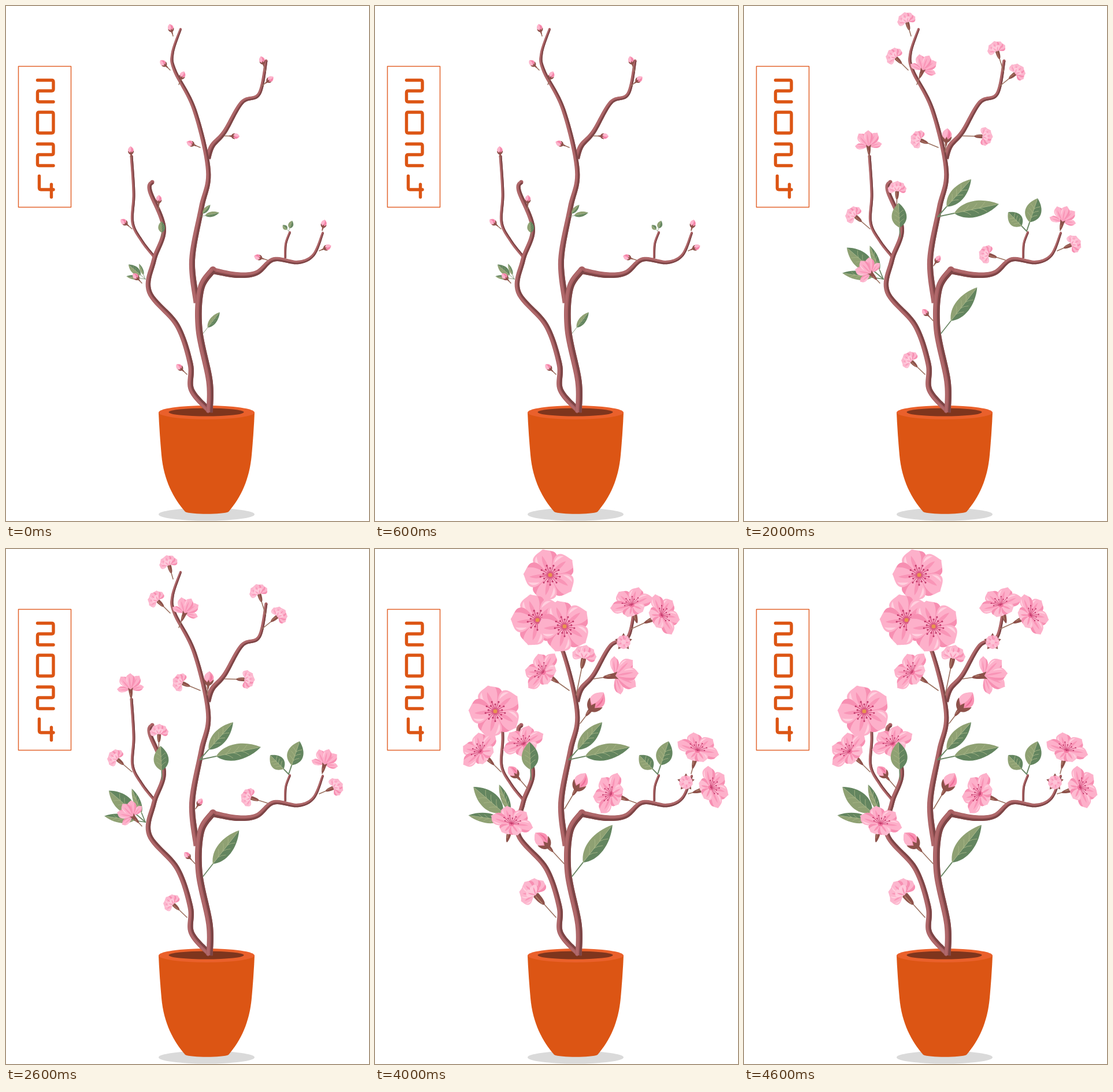
An HTML page with a canvas for the animation above (5 s loop, 628 by 892 pixels).

```html
<!DOCTYPE html>
<html lang="en">
<head>
<meta charset="utf-8">
<title>Blossom in a pot</title>
<style>
  html, body { margin: 0; width: 100%; height: 100%; overflow: hidden; background: #fff; }
  canvas { display: block; }
</style>
</head>
<body>
<canvas id="stage" width="628" height="892" role="img" aria-label="2024"></canvas>
<script>
const g = document.getElementById('stage').getContext('2d');
const STEP = 1000, STAGES = 5;
const WOOD = '#a95f62', WOOD_DARK = '#7c4546';
const CALYX = '#8d514a', STALK = '#9a7160', MAGENTA = '#c33a6b', ORANGE = '#dc5514';

// ---------- helpers ----------
const mix = (a, b, t) => a + (b - a) * t;
const fill = (d, color) => { g.fillStyle = color; g.fill(new Path2D(d)); };
const line = (d, color, width) => {
  g.strokeStyle = color; g.lineWidth = width;
  g.stroke(new Path2D(d));
};
const ellipse = (x, y, rx, ry, color) => {
  g.fillStyle = color;
  g.beginPath(); g.ellipse(x, y, rx, ry, 0, 0, 7); g.fill();
};
function within(x, y, angle, sx, sy, paint) {
  g.save();
  g.translate(x, y); g.rotate(angle); g.scale(sx, sy);
  paint();
  g.restore();
}

// ---------- pot and sign ----------
function pot() {
  ellipse(347, 880.5, 83, 11, '#dadada');
  fill('M264 704C265 730 267 755 269 778C273 822 290 853 310 876C320 881 375 881 385 876C407 850 421 820 425 778C427 755 429 730 430 704Z', ORANGE);
  ellipse(347, 704, 83, 12, '#ea602b');
  ellipse(346.5, 703.5, 65, 7, '#7e351d');
}

function sign() {
  g.lineCap = g.lineJoin = 'round';
  line('M21.5 104.5H112.5V348.5H21.5Z', '#e2642c', 1.5);
  const two = y => `M54.5 ${y}H79q3 0 3 3v12.5q0 3 -3 3H57.5q-3 0 -3 3v13q0 3 3 3H82`;
  line(two(128.5) + two(239), ORANGE, 5.4);
  line('M57.5 184H79q3 0 3 3V217q0 3 -3 3H57.5q-3 0 -3 -3V187q0 -3 3 -3Z', ORANGE, 5.4);
  line('M57.5 294.5V315q0 3 3 3H82M78.5 309V331', ORANGE, 5.4);
}

// ---------- branches: a smooth curve through a few points, tapering from one width to another ----------
function branch(thick, thin, ...points) {
  const n = points.length / 2, steps = 12 * (n - 1);
  const knot = (i, k) => points[2 * Math.max(0, Math.min(n - 1, i)) + k];
  const spline = (i, t, k) => {
    const [a, b, c, d] = [-1, 0, 1, 2].map(o => knot(i + o, k));
    return b + t / 2 * (c - a + t * (2 * a - 5 * b + 4 * c - d + t * (3 * (b - c) + d - a)));
  };
  const mid = Array.from({ length: steps + 1 }, (_, s) =>
    [0, 1].map(k => spline(Math.floor(s / 12), s % 12 / 12, k)));
  const edge = side => mid.map(([x, y], i) => {
    const a = mid[Math.max(0, i - 1)], b = mid[Math.min(steps, i + 1)];
    const dx = b[0] - a[0], dy = b[1] - a[1];
    const s = side * mix(thick, thin, i / steps) / 2 / Math.hypot(dx, dy);
    return [x - dy * s, y + dx * s];
  });
  const band = (from, to, color) =>
    fill('M' + [...edge(from), ...edge(to).reverse()].join('L') + 'Z', color);
  ellipse(...mid[steps], thin / 2, thin / 2, WOOD);
  band(-1, 1, WOOD);
  band(-0.8, -0.2, '#b06a6c');
  band(0.2, 1, WOOD_DARK);
}

function tree() {
  branch(5, 5, 256,434, 235,407, 219,375, 221,325, 217,260);
  branch(4, 4, 483,437, 484,412, 491,392);
  branch(10, 5, 349,264, 357,242, 378,218, 408,167, 438,152, 450,95);
  branch(11, 4, 330,514, 322,440, 338,350, 350,285, 326,180, 292,112, 288,82, 302,40);
  branch(10, 7, 353,702, 321,665, 319,620, 296,553, 248,495, 256,440, 273,385, 249,320, 253,305);
  branch(11, 4, 356,458, 400,466, 434,462, 463,439, 505,444, 532,431, 548,393);
  branch(11, 12, 352,704, 352,650, 334,560, 337,490, 358,457);
}

// ---------- leaves: the tip's offset from the root is given at full growth ----------
const early = stage => Math.min(1, 0.32 + 0.46 * stage);
const late = stage => 1 - 0.6 * Math.exp(-0.75 * stage);

function leaf(x, y, tx, ty, half, size) {
  const stalk = 0.27, len = Math.hypot(tx, ty) * (1 - stalk);
  const side = h => `M0 0C${len * 0.22} ${h * 1.35} ${len * 0.65} ${h * 1.3} ${len} 0Z`;
  within(x, y, 0, size, size, () => {
    line(`M0 0L${tx * stalk} ${ty * stalk}`, '#6d8a68', 2);
    within(tx * stalk, ty * stalk, Math.atan2(ty, tx), 1, 1, () => {
      fill(side(-half), '#8fa173');
      fill(side(half), '#63855f');
      let veins = `M0 0H${len * 0.93}`;
      for (const f of [0.2, 0.38, 0.56])
        for (const s of [-1, 1]) veins += `M${len * f} 0q${len * 0.08} ${s * half * 0.15} ${len * 0.15} ${s * half * 0.6}`;
      line(veins, '#a9b787', 0.8);
    });
  });
}

function leaves(stage) {
  leaf(335, 365, 58, -65, 12, early(stage));
  leaf(335, 365, 106, -22, 14, early(stage));
  leaf(489, 390, 19, -57, 14, early(stage));
  leaf(489, 390, -32, -33, 12, early(stage));
  leaf(341, 567, 72, -92, 15, late(stage));
  leaf(241, 473, -73, -63, 16, late(stage));
  leaf(241, 473, -82, -12, 9, late(stage));
  leaf(241, 473, -27, -67, 7, late(stage));
}

// ---------- blossom parts, drawn pointing up in units of the head's radius ----------
function petal(turn, len = 1, wide = len, y = 0, tint = '#fdb0ca') {
  within(0, y, turn * Math.PI / 180, wide, len, () => {
    fill('M0 0C-.1 -.22 -.5 -.4 -.46 -.7C-.42 -.9 -.16 -.94 .02 -1.03C.14 -.93 .42 -.88 .45 -.66C.48 -.4 .1 -.22 0 0Z', tint);
    fill('M0 0C.1 -.22 .48 -.4 .45 -.66C.43 -.8 .36 -.84 .26 -.88C.32 -.55 .14 -.3 0 0Z', '#f78fb2');
    fill('M0 0C-.12 -.3 -.18 -.55 -.08 -.8C.02 -.55 .05 -.3 0 0Z', '#f995b7');
    fill('M-.28 -.4C-.42 -.55 -.42 -.72 -.28 -.84C-.3 -.7 -.3 -.55 -.28 -.4Z', '#ffd0df');
  });
}

function stamens(from, to, count, reach) {
  for (let i = 0; i < count; i++) {
    const a = mix(from, to, i / (count - 1)) * Math.PI / 180, r = reach * (i % 2 ? 1 : 0.7);
    const x = r * Math.sin(a), y = -r * Math.cos(a);
    line(`M0 0L${x} ${y}`, MAGENTA, 0.02);
    ellipse(x, y, 0.035, 0.035, MAGENTA);
  }
}

function calyx(top, bottom, wide) {
  fill(`M${-wide} ${top}Q0 ${top - 0.2} ${wide} ${top}C${wide} ${bottom - 0.3} ${wide / 2} ${bottom} 0 ${bottom}C${-wide / 2} ${bottom} ${-wide} ${bottom - 0.3} ${-wide} ${top}Z`, CALYX);
  line(`M${-wide * 0.3} ${top + 0.1}V${bottom - 0.2}`, '#b07f6b', wide * 0.35);
}

const paint = {
  bud() {
    calyx(0.7, 1.65, 0.2);
    fill('M0 -1C.4 -.75 .75 -.35 .68 0C.6 .5 .3 .8 0 .85C-.35 .8 -.65 .5 -.68 0C-.72 -.35 -.45 -.75 0 -1Z', '#f994b4');
    fill('M0 -1C-.45 -.75 -.72 -.35 -.68 0C-.6 .25 -.4 .4 -.2 .45C.1 .1 .15 -.5 0 -1Z', '#fdb5cd');
    fill('M.2 -.65C.5 -.3 .45 .2 .2 .5C.25 .1 .3 -.3 .2 -.65Z', '#ef6f9a');
    fill('M0 1.1C-.45 1 -.75 .6 -.72 .1C-.5 .35 -.3 .5 -.2 .6L0 .2L.2 .6C.3 .5 .5 .35 .72 .1C.75 .6 .45 1 0 1.1Z', CALYX);
  },
  half() {
    calyx(0.6, 1.65, 0.26);
    for (const a of [-78, 75, -42, 40, 0]) petal(a, 1.25, 1.2, 0.45, '#fcb6ce');
    for (const a of [-28, 30]) petal(a, 0.85, 0.85, 0.6, '#fec8da');
  },
  tulip() {
    calyx(0.4, 1.15, 0.15);
    for (const a of [-85, 82]) petal(a, 1, 0.5, 0.5);
    for (const a of [-34, 36, 2]) petal(a, 1.2, 0.75, 0.5);
    fill('M-.2 .35L0 .5L.2 .35L.1 .75H-.1Z', CALYX);
  },
  side() {
    calyx(0.5, 1, 0.11);
    within(0, 0.12, 0, 1, 0.82, () => {
      for (const a of [-24, 32, -80, 84]) petal(a, 1, 0.78);
      for (const a of [-150, 142]) petal(a, 0.66, 0.72, 0, '#fdbbd1');
      ellipse(0, 0, 0.12, 0.12, '#f376a0');
      stamens(-75, 70, 9, 0.48);
    });
  },
  full() {
    for (let i = 0; i < 5; i++) petal(-17 + 72 * i, 1, 1.04);
    ellipse(0, 0, 0.15, 0.15, '#f17ba2');
    stamens(0, 340, 18, 0.38);
    ellipse(0, 0, 0.08, 0.08, '#e8944f');
  },
  nub() {
    for (let i = 0; i < 5; i++)
      within(0, 0, i * Math.PI * 0.4, 1, 1, () => fill('M-.4 -.6L0 -1.3L.4 -.6Z', CALYX));
    for (let i = 0; i < 5; i++) petal(36 + 72 * i, 1, 1.3, 0, '#fcb6ce');
    ellipse(0, 0, 0.35, 0.35, '#fdc4d7');
  }
};

// Head radius by age, for each form.
const forms = {
  b: ['bud', age => 7 + 5 * age],
  h: ['half', age => 5 + 4 * age],
  t: ['tulip', age => 13 + 5 * age],
  s: ['side', age => 5 + 8 * age],
  f: ['full', age => 13 + 8 * age],
  n: ['nub', () => 12]
};

// A blossom leaves its root, pauses as a bud, then opens; `life` names its form at each stage.
function blossom(stage, life, x, y, budX, budY, openX = budX, openY = budY, scale = 1) {
  if (life[stage] === '.') return;
  const age = stage - life.search(/\w/), [kind, radius] = forms[life[stage]];
  const place = (root, bud, open) =>
    stage === 4 ? open : !age ? mix(root, bud, 0.5) : stage === 3 ? mix(bud, open, 0.4) : mix(root, bud, 0.9 + 0.1 * age);
  const hx = place(x, budX, openX), hy = place(y, budY, openY), r = radius(age) * scale;
  const faceOn = kind === 'full';
  if (!faceOn) line(`M${x} ${y}L${hx} ${hy}`, STALK, 1.6);
  within(hx, hy, faceOn ? 0 : Math.atan2(hx - x, y - hy), r, r, paint[kind]);
}

function blossoms(stage) {
  const bloom = (...args) => blossom(stage, ...args);
  bloom('bbhsf', 289,52, 281,24, 303,45);
  bloom('bbhsf', 284,111, 260,87, 281,123);
  bloom('bbttf', 299,136, 312,104, 328,134);
  bloom('bbhss', 449,113, 437,75, 443,93);
  bloom('bbhss', 442,139, 472,115, 499,113);
  bloom('bbhss', 336,245, 302,231, 288,211);
  bloom('bbhtt', 378,225, 416,226, 432,217);
  bloom('bbtsf', 217,265, 215,235, 208,281);
  bloom('bbhss', 218,386, 190,362, 180,348);
  bloom('bbhss', 264,352, 265,317, 256,334);
  bloom('bbtss', 235,480, 214,457, 237,472);
  bloom('bbhss', 452,440, 420,430, 405,423);
  bloom('bbtss', 547,389, 553,365, 559,345);
  bloom('bbhss', 542,424, 570,412, 585,412);
  bloom('bbhhh', 313,638, 287,613, 270,590);
  bloom('.bbhh', 348,253, 351,224, 363,180);
  bloom('...bb', 264,415, 239,386);
  bloom('..bbb', 328,450, 343,427, 356,403);
  bloom('..bbb', 327,545, 300,516, 289,504);
  bloom('...bb', 355,302, 366,290, 384,264, 1.6);
  bloom('....n', 430,161, 430,161);
  bloom('....n', 538,404, 538,404);
}

// ---------- playback: one growth stage per second ----------
function draw(time) {
  const stage = Math.floor(time / STEP) % STAGES;
  g.clearRect(0, 0, 628, 892);
  sign();
  pot();
  tree();
  leaves(stage);
  blossoms(stage);
  leaf(270, 400, -3, -68, 15, late(stage));
}

let start;
function tick(now) {
  start ??= now;
  draw(now - start);
  requestAnimationFrame(tick);
}
requestAnimationFrame(tick);
</script>
</body>
</html>
```
